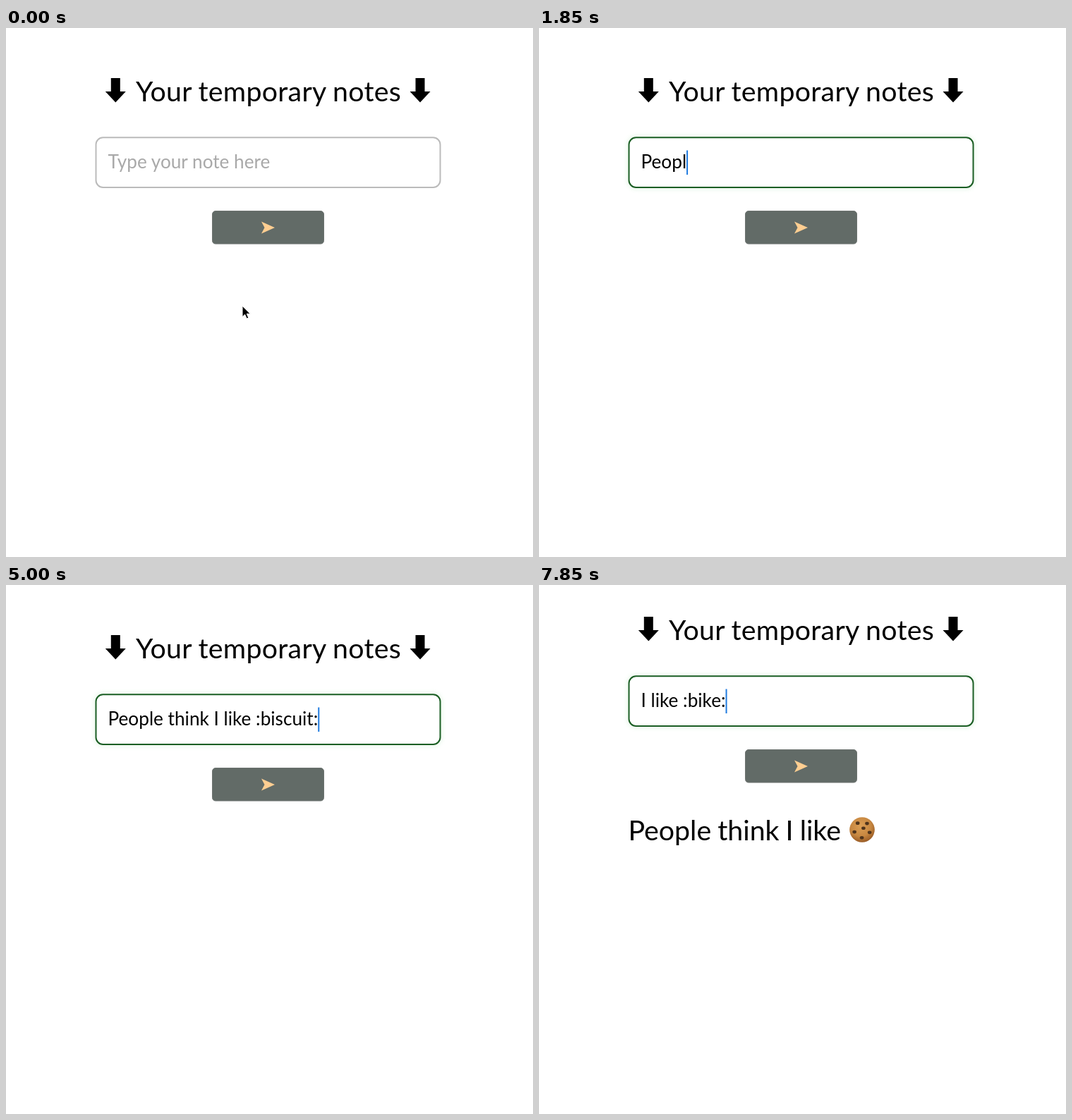
An HTML page for the animation above (8 s loop, 747 px wide and 750 px high).

```html
<!DOCTYPE html>
<html lang="en">
<head>
<meta charset="utf-8">
<title>Temporary notes</title>
<style>
  html, body { margin: 0; width: 100%; height: 100%; overflow: hidden; background: #fff; }
  svg { display: block; width: 747px; height: 750px; }
  text { font-family: Lato, "Open Sans", sans-serif; white-space: pre; }
  .large { font-size: 39.3px; word-spacing: -1px; }
  .title { letter-spacing: .3px; }
  .small { font-size: 26.2px; }
</style>
</head>
<body>
<svg viewBox="0 0 747 750">
  <defs>
    <path id="down" d="M-6.5 71H6.5V90H14.5L0 105.5L-14.5 90H-6.5Z"/>
    <radialGradient id="dough" cx=".45" cy=".35" r=".68">
      <stop offset="0" stop-color="#dc9f55"/>
      <stop offset=".6" stop-color="#c78740"/>
      <stop offset="1" stop-color="#945622"/>
    </radialGradient>
    <filter id="blur" x="-10%" y="-30%" width="120%" height="160%">
      <feGaussianBlur stdDeviation="3"/>
    </filter>
  </defs>

  <g id="form">
    <use href="#down" x="155.3"/>
    <text class="large title" x="184" y="103.5">Your temporary notes</text>
    <use href="#down" x="587"/>

    <rect id="glow" x="127.5" y="155.3" width="488" height="70.7" rx="10"
          fill="none" stroke="#8fd895" stroke-width="3" filter="url(#blur)"/>
    <rect id="field" x="127.5" y="155.3" width="488" height="70.7" rx="10" fill="#fff" stroke-width="2"/>
    <text id="hint" class="small" x="144.5" y="199.3" fill="#a9a9a9">Type your note here</text>
    <text id="typed" class="small" x="144.5" y="199.3"></text>
    <rect id="caret" y="173.5" width="2" height="34.5" fill="#1f7be0"/>

    <rect x="292.5" y="259.5" width="158" height="46.5" rx="4.5" fill="#626b67" stroke="#6d7370"/>
    <path d="M362 274.5L381 283L362 291.5L366.5 283Z" fill="#ffce91"/>
  </g>

  <g id="note">
    <text class="large" x="126.5" y="361.5">People think I like</text>
    <g transform="translate(458 347)">
      <circle r="17.8" fill="url(#dough)"/>
      <g id="chips" fill="#4f341c"></g>
    </g>
  </g>

  <path id="arrow" d="M0 0V15.5L3.6 12.2L6.2 18L8.8 16.9L6.3 11.2H11.2Z" stroke="#fff"/>
  <path id="beam" d="M-3.5 -8.5Q0 -8.5 0 -6Q0 -8.5 3.5 -8.5M0 -6V6M-3.5 8.5Q0 8.5 0 6Q0 8.5 3.5 8.5M-2 2.5H2"
        fill="none" stroke="#111" stroke-width="1.4"/>
</svg>

<script>
const LOOP = 8000, STEP = 50, FOCUS = 950, TYPE = 1450, SEND = 5250;
const $ = id => document.getElementById(id);
const ramp = (t, from, to) => Math.max(0, Math.min(1, (t - from) / (to - from)));
const mix = (a, b, k) => a + (b - a) * k;
const show = (id, on) => { $(id).style.display = on ? "" : "none"; };

// Each burst is typed at an even pace; "<" deletes and "\n" sends
const bursts = [
  { keys: "People think", from: TYPE, to: 2550 },
  { keys: " I like ", from: 2900, to: 3700 },
  { keys: ":biscuit:", from: 3950, to: 4900 },
  { keys: "\n", from: SEND, to: SEND },
  { keys: "I like ", from: 5650, to: 6250 },
  { keys: "b<", from: 6550, to: 6800 },
  { keys: ":bike:", from: 7050, to: 7650 },
];

function textAt(t) {
  let text = "";
  for (const { keys, from, to } of bursts) {
    if (t < from) break;
    const count = 1 + Math.floor(ramp(t, from, to || 1) * (keys.length - 1) + 1e-6);
    for (const key of keys.slice(0, count)) {
      text = key === "\n" ? "" : key === "<" ? text.slice(0, -1) : text + key;
    }
  }
  return text;
}

// The pointer jumps up into the field, then drifts to the place it clicks
function pointerAt(t) {
  const jump = ramp(t, 0, 250), drift = ramp(t, 550, 1000);
  return [335 + 17 * jump + 3 * drift, 394 - 208 * jump - 15 * drift];
}

// One chip in the middle and five around it
const chips = Array.from({ length: 6 }, (_, i) => {
  const r = i ? 11.3 : 2, a = i * Math.PI * 0.4 + 0.35;
  return `<ellipse cx="${r * Math.cos(a)}" cy="${r * Math.sin(a) - (i ? 0 : 3)}" rx="2.8" ry="2.3"/>`;
});
$("chips").innerHTML = chips.join("");

function draw(t) {
  const text = textAt(t), focus = ramp(t, FOCUS, 1300);
  $("typed").textContent = text;
  show("hint", !text);
  show("caret", t >= FOCUS);
  $("caret").setAttribute("x", 144.5 + (text ? $("typed").getComputedTextLength() : 0));

  const rgb = [27, 94, 36].map(c => Math.round(mix(187, c, focus)));
  $("field").setAttribute("stroke", `rgb(${rgb})`);
  $("glow").setAttribute("opacity", focus * 0.4);

  $("form").setAttribute("transform", `translate(0 ${t < SEND ? 0 : -26})`);
  show("note", t >= SEND);

  const [x, y] = pointerAt(t), inField = y < 227;
  show("arrow", t < TYPE && !inField);
  show("beam", t < TYPE && inField);
  for (const id of ["arrow", "beam"]) $(id).setAttribute("transform", `translate(${x} ${y})`);
}

const start = performance.now();
function tick() {
  const t = (performance.now() - start) % LOOP;
  draw(Math.floor(t / STEP) * STEP);
  requestAnimationFrame(tick);
}
tick();
</script>
</body>
</html>
```
